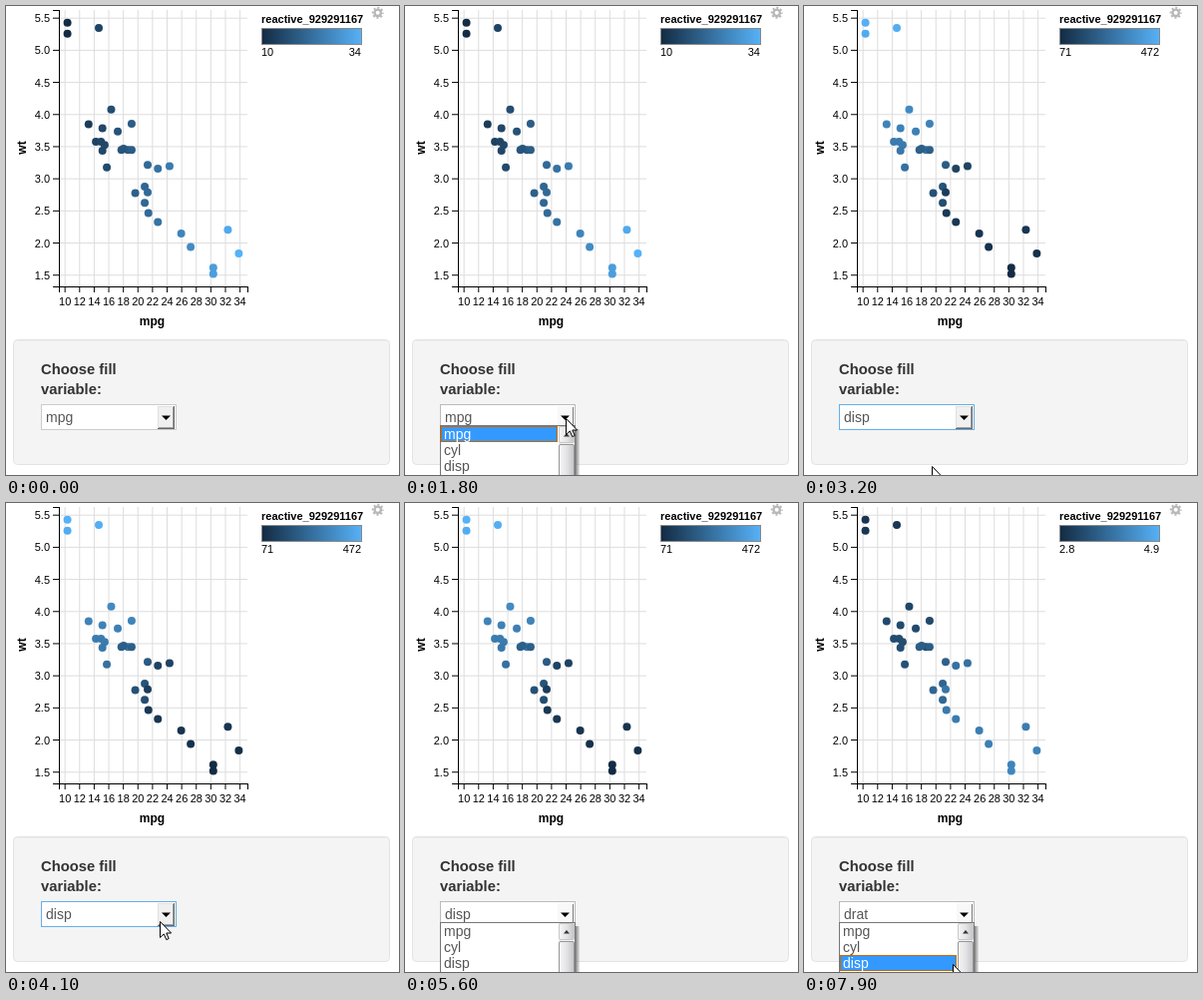
An HTML page for the animation above (8 s loop, 394 by 470 pixels).

```html
<!DOCTYPE html>
<html lang="en">
<head>
<meta charset="utf-8">
<title>Scatter plot with fill selector</title>
<style>
html, body { margin: 0; width: 100%; height: 100%; overflow: hidden; background: #fff; }
svg { display: block; width: 394px; height: 470px; font: 11px "Liberation Sans", Arial, sans-serif; }
.crisp { shape-rendering: crispEdges; }
.grid { stroke: #ddd; }
.axis { stroke: #000; fill: none; }
.title { font-weight: bold; font-size: 12px; text-anchor: middle; }
.label { font-weight: bold; font-size: 14.8px; fill: #333; }
.field { font-size: 14px; fill: #555; }
.end { text-anchor: end; }
.mid { text-anchor: middle; }
</style>
</head>
<body>
<svg viewBox="0 0 394 470">
  <defs>
    <linearGradient id="ramp"><stop stop-color="#132b43"/><stop offset="1" stop-color="#56b1f7"/></linearGradient>
    <linearGradient id="thumb"><stop stop-color="#f5f5f5"/><stop offset=".5" stop-color="#e4e4e6"/><stop offset="1" stop-color="#c4c4c8"/></linearGradient>
    <linearGradient id="shade"><stop stop-color="#555" stop-opacity=".75"/><stop offset="1" stop-color="#888" stop-opacity=".2"/></linearGradient>
    <clipPath id="reveal"><rect id="window" x="35" y="420" width="136"/></clipPath>
  </defs>

  <g id="plot"></g>

  <text x="256" y="17" font-weight="bold">reactive_929291167</text>
  <rect class="crisp" x="256.5" y="22.5" width="100" height="16" fill="url(#ramp)" stroke="#888"/>
  <text id="low" x="256" y="50"></text>
  <text id="high" class="end" x="356" y="50"></text>
  <g fill="none" stroke="#b8b8b8" transform="translate(372.7 6.8)">
    <circle r="3.2" stroke-width="2.4"/>
    <circle r="5" stroke-width="2" stroke-dasharray="2 1.927" stroke-dashoffset="1"/>
  </g>

  <rect x="7.5" y="334.5" width="377" height="125" rx="4" fill="#f4f4f4" stroke="#e3e3e3"/>
  <path d="M10 335.5H382" stroke="#ebebeb"/>
  <text class="label" x="35" y="369">Choose fill</text>
  <text class="label" x="35" y="389">variable:</text>

  <rect id="box" class="crisp" x="35.5" y="399.5" width="135" height="25" fill="#fff"/>
  <text id="value" class="field" x="40" y="417"></text>
  <g id="raised" class="crisp" fill="none">
    <rect x="152" y="401" width="17" height="23" fill="#f0f0f0"/>
    <path d="M152.5 423V401.5H168" stroke="#e0e0e0"/>
    <path d="M153 422.5H167.5V402" stroke="#a0a0a0"/>
    <path d="M152 423.5H168.5V401" stroke="#666"/>
  </g>
  <g id="pressed" class="crisp">
    <rect x="153" y="401" width="16" height="20" fill="#f8f8f8"/>
    <path id="edge" d="M168.5 402V420"/>
  </g>
  <path d="M156 410.5h9l-4.5 4.5z"/>

  <rect id="shadow" x="171" y="424" width="4" height="46" fill="url(#shade)"/>
  <g id="menu" clip-path="url(#reveal)">
    <g id="list">
      <rect class="crisp" id="frame" x="35.5" y="420.5" width="135" fill="#fff" stroke="#777"/>
      <rect class="crisp" id="mark" x="36.5" width="116" height="15" fill="#3399ff" stroke="#cc6600"/>
    </g>
    <g id="scroll">
      <rect x="154" y="421" width="16" height="49" fill="#efefef"/>
      <rect x="154.5" y="421.5" width="15" height="16" rx="1.5" fill="url(#thumb)" stroke="#c8c8c8"/>
      <path d="M159 431.5h6l-3 -3.5z" fill="#333"/>
      <rect x="154.5" y="439.5" width="15" height="60" rx="1.5" fill="url(#thumb)" stroke="#979797"/>
    </g>
  </g>
  <path id="cursor" d="M.5 .5V16.5L4.3 12.9L6.8 18.6L9.2 17.5L6.8 12H11.6Z" fill="#fff" stroke="#000"/>
</svg>
<script>
const LOOP = 8000, STEP = 100, TOP = 421, ROW = 16;
const $ = id => document.getElementById(id);
const clamp = v => Math.max(0, Math.min(1, v));
const mix = (a, b, p) => a + (b - a) * p;
const show = (id, on) => $(id).setAttribute('visibility', on ? 'visible' : 'hidden');

function add(parent, tag, attrs, text) {
  const el = document.createElementNS('http://www.w3.org/2000/svg', tag);
  for (const k in attrs) el.setAttribute(k, attrs[k]);
  if (text !== undefined) el.textContent = text;
  return parent.appendChild(el);
}

// [mpg, wt] pairs by number of cylinders
const groups = [
  [8, [[14.3, 3.57], [18.7, 3.44], [16.4, 4.07], [17.3, 3.73], [15.2, 3.78], [10.4, 5.25], [10.4, 5.42],
    [14.7, 5.34], [15.5, 3.52], [15.2, 3.43], [13.3, 3.84], [19.2, 3.85], [15.8, 3.17], [15, 3.57]]],
  [6, [[21, 2.62], [21, 2.87], [21.4, 3.21], [18.1, 3.46], [19.2, 3.44], [17.8, 3.44], [19.7, 2.77]]],
  [4, [[22.8, 2.32], [24.4, 3.19], [22.8, 3.15], [32.4, 2.2], [30.4, 1.61], [33.9, 1.83], [21.5, 2.46],
    [27.3, 1.93], [26, 2.14], [30.4, 1.51], [21.4, 2.78]]]
];
const cars = groups.flatMap(([cyl, list]) => list.map(([mpg, wt]) => ({ cyl, mpg, wt })));

const fills = [
  { name: 'mpg', min: 10.4, max: 33.9, digits: 0, start: -LOOP, of: c => c.mpg },
  { name: 'disp', min: 71.1, max: 472, digits: 0, start: 3000, of: c => 7 + 10.7 * c.cyl * c.wt },
  { name: 'drat', min: 2.76, max: 4.93, digits: 1, start: 6000, of: c => 5.05 - .13 * c.cyl - .2 * c.wt }
];
const names = ['mpg', 'cyl', 'disp', 'hp', 'drat', 'wt', 'qsec', 'vs', 'am', 'gear'];
const HEIGHT = names.length * ROW + 2;
const opens = [1500, 4300, 7300];

// time, x, y of the pointer tip
const path = [
  [500, 350, 472], [1400, 161, 413], [2000, 161, 413], [2600, 128, 461], [3400, 128, 461],
  [4300, 162, 407], [4700, 162, 407], [4800, 157, 428], [5600, 148, 490], [6600, 139, 480],
  [7000, 155, 418], [7500, 155, 418], [7900, 149, 462]
];

const px = v => 53 + (v - 9.225) * 7.311;
const py = v => 281 - (v - 1.3174) * 64.39;

const plot = $('plot');
for (let v = 10; v <= 34; v += 2) {
  const x = px(v) + .5;
  add(plot, 'path', { class: 'grid', d: `M${x} 4V281` });
  add(plot, 'path', { class: 'axis', d: `M${x} 281V287` });
  add(plot, 'text', { class: 'mid', x, y: 300 }, v);
}
for (let v = 1.5; v <= 5.5; v += .5) {
  const y = py(v) + .5;
  add(plot, 'path', { class: 'grid', d: `M54 ${y}H242` });
  add(plot, 'path', { class: 'axis', d: `M47 ${y}H53` });
  add(plot, 'text', { class: 'end', x: 44, y: Math.round(y + 4) }, v.toFixed(1));
}
add(plot, 'path', { class: 'crisp axis', d: 'M47 4.5H53.5V281.5H47M53.5 287V281.5H242.5V287' });
add(plot, 'text', { class: 'title', x: 146.5, y: 320 }, 'mpg');
add(plot, 'text', { class: 'title', transform: 'translate(20 142) rotate(-90)' }, 'wt');
const dots = cars.map(c => add(plot, 'circle', { cx: px(c.mpg), cy: py(c.wt), r: 4 }));

$('frame').setAttribute('height', HEIGHT - 1);
const items = names.map((n, i) => add($('list'), 'text', { class: 'field', x: 39, y: TOP + i * ROW + 13 }, n));

function pointer(t) {
  const next = path.findIndex(k => k[0] > t);
  if (next === 0) return path[0].slice(1);
  if (next < 0) return path[path.length - 1].slice(1);
  const [t0, x0, y0] = path[next - 1], [t1, x1, y1] = path[next];
  const p = (t - t0) / (t1 - t0);
  return [mix(x0, x1, p), mix(y0, y1, p)];
}

// The last row hovered since the menu opened
function hovered(start, t, row) {
  for (let s = start; s <= t; s += STEP) {
    const [x, y] = pointer(s);
    if (x < 154 && y >= TOP) row = Math.floor((y - TOP) / ROW);
  }
  return row;
}

const level = (car, f) => clamp((f.of(car) - f.min) / (f.max - f.min));

function drawDots(t, now, prev) {
  const p = clamp((t - now.start) / 230);
  const eased = p < .5 ? 4 * p ** 3 : 1 - 4 * (1 - p) ** 3;
  cars.forEach((car, i) => {
    const v = mix(level(car, prev), level(car, now), eased);
    dots[i].setAttribute('fill', `rgb(${mix(19, 86, v)}, ${mix(43, 177, v)}, ${mix(67, 247, v)})`);
  });
  const key = p > 0 ? now : prev;
  $('low').textContent = key.min.toFixed(key.digits);
  $('high').textContent = key.max.toFixed(key.digits);
}

function drawMenu(t, now) {
  const start = opens.filter(o => o <= t).pop();
  const open = start > now.start;
  const age = t - start;
  const h = open ? Math.round(HEIGHT * clamp((age + 30) / 250)) : 0;
  const full = h === HEIGHT;
  const fresh = age < STEP;
  show('menu', open);
  show('pressed', open);
  show('raised', !open);
  for (const id of ['scroll', 'shadow']) show(id, full);
  $('value').textContent = now.name;
  $('edge').setAttribute('stroke', fresh ? '#4a9fe0' : '#777');
  $('box').setAttribute('stroke', open ? (fresh ? '#888' : '#bbb') : start ? '#66afe9' : '#ccc');
  if (!open) return;
  $('window').setAttribute('height', h);
  $('list').setAttribute('transform', `translate(0 ${h - HEIGHT})`);
  const row = hovered(start, t, names.indexOf(now.name));
  $('mark').setAttribute('y', TOP + row * ROW + .5);
  items.forEach((el, i) => { el.style.fill = i === row ? '#fff' : ''; });
}

function draw(ms) {
  const t = Math.floor(ms % LOOP / STEP) * STEP;
  const i = fills.filter(f => f.start <= t).length - 1;
  drawDots(t, fills[i], fills[Math.max(0, i - 1)]);
  drawMenu(t, fills[i]);
  const [x, y] = pointer(t).map(Math.round);
  $('cursor').setAttribute('transform', `translate(${x} ${y})`);
}

const began = performance.now();
(function tick() {
  draw(performance.now() - began);
  requestAnimationFrame(tick);
})();
</script>
</body>
</html>
```
